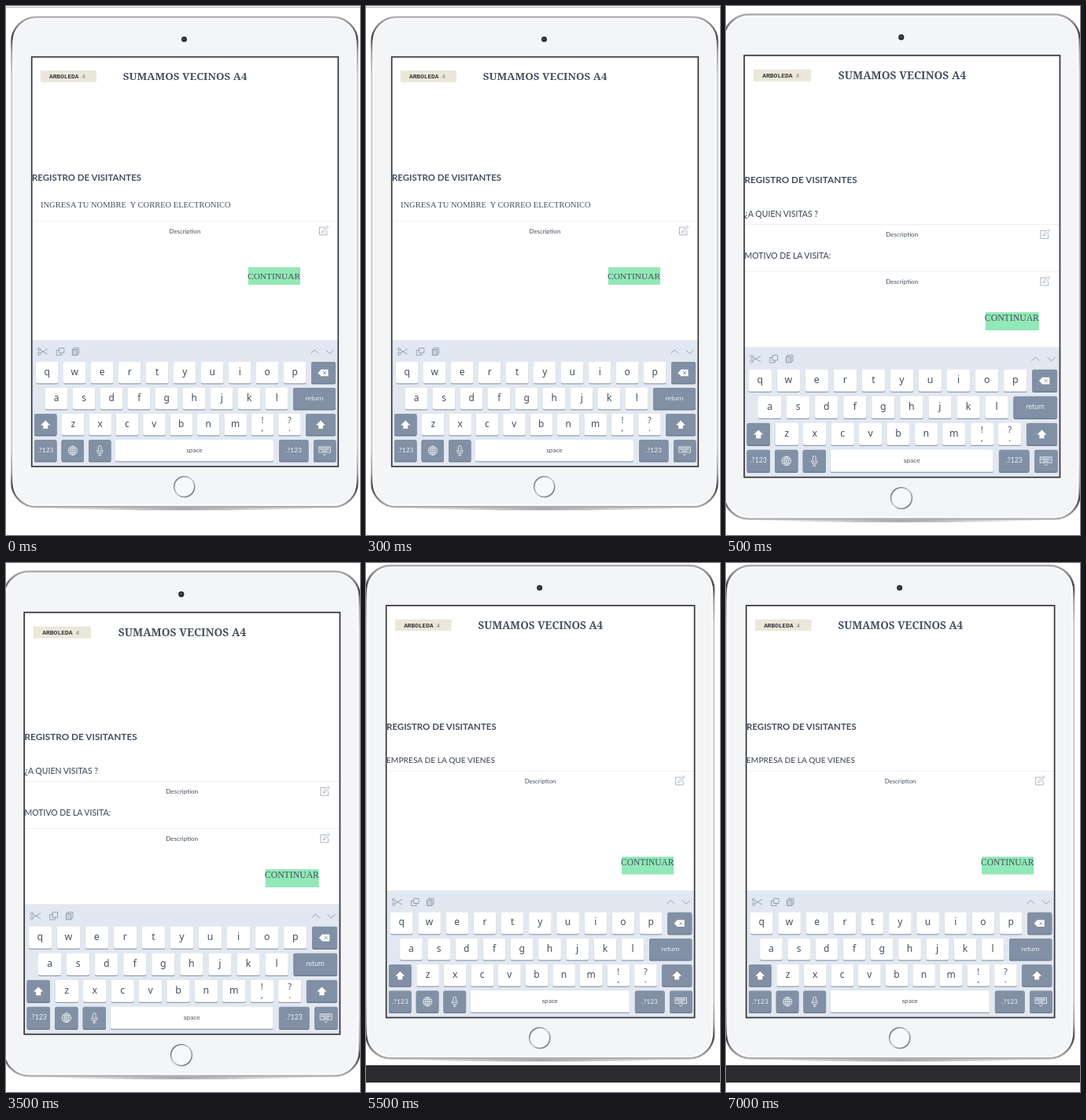
Animation of 450x672 px, one loop 8000 ms. Source, as an HTML page:

```html
<!DOCTYPE html>
<html lang="es">
<head>
<meta charset="utf-8">
<title>Registro de visitantes</title>
<style>
html, body { margin: 0; width: 100%; height: 100%; overflow: hidden; background: #fff; }
svg { display: block; width: 100vw; height: 100vh; }
text { white-space: pre; }
.lato { font-family: Lato, sans-serif; }
.sans { font-family: "Noto Sans", sans-serif; }
.serif { font-family: "Noto Serif", serif; }
.times { font-family: "Liberation Serif", serif; }
.mono { font-family: "Liberation Mono", monospace; }
</style>
</head>
<body>
<svg id="stage" viewBox="0 0 450 672">
  <defs>
    <linearGradient id="metal" x1="0" y1="0" x2="0" y2="1">
      <stop offset="0" stop-color="#aeafb2"/>
      <stop offset=".015" stop-color="#8d8e91"/>
      <stop offset=".04" stop-color="#48494c"/>
      <stop offset=".07" stop-color="#a9aaad"/>
      <stop offset=".12" stop-color="#cfd0d3"/>
      <stop offset=".88" stop-color="#cfd0d3"/>
      <stop offset=".93" stop-color="#a9aaad"/>
      <stop offset=".96" stop-color="#48494c"/>
      <stop offset=".985" stop-color="#8d8e91"/>
      <stop offset="1" stop-color="#aeafb2"/>
    </linearGradient>
    <linearGradient id="ring" x1="0" y1="0" x2="1" y2="1">
      <stop offset="0" stop-color="#55575a"/>
      <stop offset=".5" stop-color="#c9cacd"/>
      <stop offset="1" stop-color="#55575a"/>
    </linearGradient>
    <linearGradient id="shade">
      <stop offset="0" stop-color="#a5a6a9" stop-opacity="0"/>
      <stop offset=".5" stop-color="#a5a6a9"/>
      <stop offset="1" stop-color="#a5a6a9" stop-opacity="0"/>
    </linearGradient>
  </defs>
  <rect id="topLine" y="1" width="450" height="1" fill="#b4b4b6"/>
  <rect id="footer" y="638" width="450" height="22" fill="#2c2c2f"/>
  <g id="tablet"></g>
</svg>
<script>
const INK = '#46505f', SLATE = '#8190a5', PALE = '#eef2f7';
const LOOP = 8000;
const $ = id => document.getElementById(id);

const rect = (x, y, w, h, fill, extra = '') =>
  `<rect x="${x}" y="${y}" width="${w}" height="${h}" fill="${fill}" ${extra}/>`;
const line = (d, color, width = 1, extra = '') =>
  `<path d="${d}" fill="none" stroke="${color}" stroke-width="${width}" ${extra}/>`;

// y is the middle of the capitals
const label = (s, x, y, size, font, anchor = 'start', fill = INK, weight = 400) =>
  `<text class="${font}" x="${x}" y="${y + size * .35}" font-size="${size}" ` +
  `text-anchor="${anchor}" fill="${fill}" font-weight="${weight}">${s}</text>`;

const key = (x, y, w, fill = '#fff') =>
  rect(x, y + 1, w, 27.5, fill === '#fff' ? '#929eb1' : '#68778d', 'rx="2"') +
  rect(x, y, w, 27.3, fill, 'rx="2"');

const letterRow = (letters, x, y, pitch) => [...letters].map((c, i) =>
  key(x + i * pitch, y, 28.5) +
  (c === '!' || c === '?'
    ? label(c, x + i * pitch + 14.2, y + 8.5, 11, 'sans', 'middle') +
      label(c === '!' ? ',' : '.', x + i * pitch + 14.2, y + 18.5, 11, 'sans', 'middle')
    : label(c, x + i * pitch + 14.2, y + 12.4, 12, 'sans', 'middle'))
).join('');

const darkKey = (x, y, w, text = '') => key(x, y, w, SLATE) +
  (text && label(text, x + w / 2, y + 13.4, 8.4, 'lato', 'middle', PALE));

const shift = (x, y) =>
  `<path d="M${x} ${y - 5.5}l6 6h-3v4.5h-6v-4.5h-3z" fill="#fff"/>`;

function body() {
  return '<ellipse cx="226.7" cy="636.5" rx="190" ry="4" fill="url(#shade)"/>' +
    rect(7.3, 14.3, 439.4, 622, '#f4f5f7', 'rx="31" stroke="url(#metal)" stroke-width="2.6"') +
    rect(9.3, 16.3, 435.4, 618, 'none', 'rx="29" stroke="#fff" stroke-width="1.4"') +
    '<circle cx="226.5" cy="42.3" r="3.5" fill="#2b2c30"/>' +
    '<circle cx="226.2" cy="42" r="1.2" fill="#565a66"/>' +
    '<circle cx="226.7" cy="610.7" r="13" fill="#f7f8fa" stroke="url(#ring)" stroke-width="1.6"/>' +
    rect(32.7, 64.7, 389.6, 520.3, '#fff');
}

function toolbar() {
  return line('M53 435.5L43.5 441M53 442.5L43.5 437', SLATE, .8) +
    `<g fill="none" stroke="${SLATE}" stroke-width=".8">` +
    '<circle cx="42" cy="436.2" r="1.7"/><circle cx="42" cy="441.8" r="1.7"/>' +
    '<path d="M67.5 434.5h6.3v6.3h-6.3zM67.5 437.3h-3.2v6.4h6.4v-2.9"/>' +
    '<path d="M86 436v-1.6h6.6v7.4H91"/><rect x="84.3" y="436.4" width="6.3" height="7.2" fill="#c6cfdb"/>' +
    '<path d="M387.3 441.5l4.9-4.6 4.9 4.6M406.8 437l4.9 4.6 4.9-4.6"/></g>';
}

function globe(x, y) {
  return `<g transform="translate(${x} ${y})" fill="none" stroke="${PALE}" stroke-width=".8">` +
    '<circle r="5.6"/><ellipse rx="2.6" ry="5.6"/>' +
    '<path d="M-5.6 0H5.6M0-5.6V5.6M-4.8-2.8H4.8M-4.8 2.8H4.8"/></g>';
}

function mic(x, y) {
  return `<g transform="translate(${x} ${y})" fill="none" stroke="${PALE}" stroke-width=".9">` +
    '<rect x="-1.8" y="-6" width="3.6" height="7.6" rx="1.8"/>' +
    '<path d="M-3.6-.8v1.2a3.6 3.4 0 0 0 7.2 0v-1.2M0 3.8V6M-2 6H2"/></g>';
}

function hideIcon(x, y) {
  return `<g transform="translate(${x} ${y})" fill="none" stroke="${PALE}" stroke-width=".9">` +
    '<rect x="-7.2" y="-4.6" width="14.4" height="7"/>' +
    '<path d="M-5.7-2.7H5.7M-5.7-1.1H5.7" stroke-width="1.2" stroke-dasharray="1.6 .6"/>' +
    '<path d="M-3.5 .7H3.5M-2 4.4L0 6l2-1.6"/></g>';
}

function keyboard() {
  return rect(33, 424.5, 389, 160, '#e2e8f1') + toolbar() +
    letterRow('qwertyuiop', 38, 452, 35) + darkKey(388, 452, 31) +
    '<path d="M396.5 466l4-4.3h9v8.6h-9z" fill="#fff"/>' +
    line('M403 464l4 4M407 464l-4 4', SLATE, .9) +
    letterRow('asdfghjkl', 50, 485, 35) + darkKey(365, 485, 54, 'return') +
    darkKey(36, 518, 28.5) + shift(50.2, 532) +
    letterRow('zxcvbnm!?', 71, 518, 34.4) +
    darkKey(381, 518, 38) + shift(400, 532) +
    darkKey(36, 551, 28.5, '.?123') +
    darkKey(70.5, 551, 28.5) + globe(84.8, 564.8) +
    darkKey(105, 551, 28.5) + mic(119.2, 564.8) +
    key(139, 551, 201) + label('space', 239.5, 564, 8.2, 'lato', 'middle') +
    darkKey(347, 551, 37.5, '.?123') +
    darkKey(391, 551, 28.5) + hideIcon(405, 564.6);
}

function header() {
  return rect(44, 82, 71, 14.7, '#ebe8da') +
    label('ARBOLEDA', 55, 89.4, 7.8, 'mono', 'start', '#33363a', 700) +
    label('4', 96, 89.4, 7.8, 'mono', 'start', '#77797a') +
    label('SUMAMOS VECINOS A4', 227.6, 89.5, 13.4, 'serif', 'middle', INK, 600) +
    label('REGISTRO DE VISITANTES', 33, 218, 11.45, 'lato', 'start', INK, 700);
}

// Empty input: rule, placeholder and pencil icon
function field(y) {
  return line(`M33 ${y}H422`, '#e9ebee', .8) +
    label('Description', 227.4, y + 12.6, 7.8, 'lato', 'middle') +
    `<g transform="translate(403.5 ${y + 12})" fill="none" stroke="#98a3b3" stroke-width=".8">` +
    '<path d="M1.5-4.3H-5v9.6H4.4V0"/><path d="M-1.9 2.2l.7-2.4L4.6-6l1.6 1.6-5.8 6z"/></g>';
}

function button(x, y, textY) {
  return rect(x, y, 66, 22.3, '#92e8b6') +
    label('CONTINUAR', x + 32.6, textY, 11.4, 'times', 'middle');
}

const question = (s, y) => label(s, 33, y, 10.15, 'lato', 'start', INK, 500);

const scenes = [
  { from: 0, place: [0, 0, 1], topLine: true, form: () =>
      label('INGRESA TU NOMBRE  Y CORREO ELECTRONICO', 44, 252.5, 10.5, 'times') +
      field(273.4) + button(308, 331.8, 343) },
  { from: 500, place: [-10.5, -3.9, 1.03], form: () =>
      question('¿A QUIEN VISITAS ?', 260) + field(273.2) +
      question('MOTIVO DE LA VISITA:', 312) + field(331.2) +
      button(330.4, 381.5, 388.3) },
  { from: 5500, place: [-7.2, -11, 1.006], footer: true, form: () =>
      question('EMPRESA DE LA QUE VIENES', 260.2) + field(273.8) +
      button(330.2, 381.8, 388.6) }
];

const tablet = $('tablet');
tablet.innerHTML = body() + header() + '<g id="form"></g>' + keyboard() +
  rect(32.7, 64.7, 389.6, 520.3, 'none', 'stroke="#36383c" stroke-width="1.7"');

let shown;
function render(ms) {
  const scene = scenes.filter(s => s.from <= ms).pop();
  if (scene === shown) return;
  shown = scene;
  const [x, y, k] = scene.place;
  tablet.setAttribute('transform', `translate(${x} ${y}) scale(${k})`);
  $('form').innerHTML = scene.form();
  $('topLine').style.display = scene.topLine ? '' : 'none';
  $('footer').style.display = scene.footer ? '' : 'none';
}

const start = performance.now();
function tick() {
  render((performance.now() - start) % LOOP);
  requestAnimationFrame(tick);
}
tick();
</script>
</body>
</html>
```
